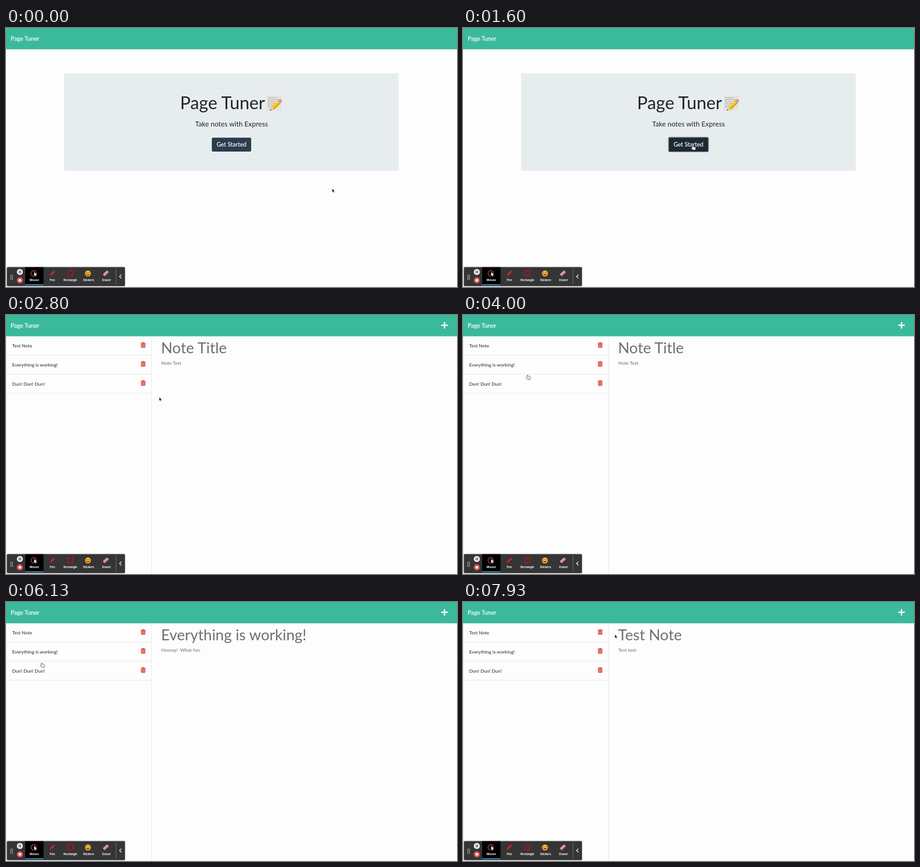
These frames come from a looping animation (986 by 568 pixels, 8 s). An HTML page:

```html
<!DOCTYPE html>
<html lang="en">
<head>
<meta charset="utf-8">
<title>Page Tuner</title>
<style>
html, body { margin: 0; width: 100%; height: 100%; overflow: hidden; background: #fdfdfd; }
svg { display: block; width: 100%; height: 100%; }
text { font-family: Lato, sans-serif; }
.dark { fill: #212529; }
.mid { text-anchor: middle; }
.light { fill: #fff; stroke: #fff; stroke-width: .2; }
.row { font-size: 10.3px; }
.title { font-size: 32.9px; fill: #6f6f6f; }
.body { font-size: 10.3px; fill: #6b6b6b; }
.rule { stroke: #e1e3e4; fill: none; }
.label text { font: 700 6.1px Inter, sans-serif; fill: #fff; text-anchor: middle; }

/* every part shares one 8 s clock */
.home, .notes, .loaded, .hover, .focus, .label, .n1, .n2, .n3, .arrow, .hand {
  animation: 8s step-end infinite;
}
.home { animation-name: home; }
.notes { animation-name: notes; }
.loaded { animation-name: loaded; }
.hover { animation-name: hover; }
.focus { animation-name: focus; }
.label { animation-name: label; }
.n1 { animation-name: n1; }
.n2 { animation-name: n2; }
.n3 { animation-name: n3; }
.hand { animation-name: hand; }
.arrow { animation-name: arrow; }
.cursor { animation: move 8s infinite; }

@keyframes home { 0% { opacity: 1 } 21.55%, 100% { opacity: 0 } }
@keyframes notes { 0% { opacity: 0 } 21.55%, 100% { opacity: 1 } }
@keyframes loaded { 0% { opacity: 0 } 22.45%, 100% { opacity: 1 } }
@keyframes hover { 0% { opacity: 0 } 7.5%, 100% { opacity: 1 } }
@keyframes focus { 0% { opacity: 0 } 17.5%, 100% { opacity: 1 } }
@keyframes label { 0% { opacity: 1 } 21.55% { opacity: 0 } 22.45%, 100% { opacity: 1 } }
@keyframes n1 { 0% { opacity: 1 } 65.7%, 100% { opacity: 0 } }
@keyframes n2 { 0% { opacity: 0 } 65.7% { opacity: 1 } 82.45%, 100% { opacity: 0 } }
@keyframes n3 { 0% { opacity: 0 } 82.45%, 100% { opacity: 1 } }
@keyframes hand {
  0% { opacity: 0 } 7.5% { opacity: 1 } 24.95% { opacity: 0 }
  35.8% { opacity: 1 } 98.2%, 100% { opacity: 0 }
}
@keyframes arrow {
  0% { opacity: 1 } 7.5% { opacity: 0 } 24.95% { opacity: 1 }
  35.8% { opacity: 0 } 98.2%, 100% { opacity: 1 }
}
/* the pointer advances about 15 times a second */
@keyframes move {
  0% { transform: translate(713px, 352px) }
  .75% { transform: translate(713px, 352px); animation-timing-function: steps(3, start) }
  3.25% { transform: translate(690px, 340px); animation-timing-function: steps(5, start) }
  7.42% { transform: translate(530px, 270px); animation-timing-function: steps(3, start) }
  9.92% { transform: translate(502px, 257px) }
  24.95% { transform: translate(502px, 257px); animation-timing-function: steps(9, start) }
  32.45% { transform: translate(380px, 190px) }
  34.1% { transform: translate(380px, 190px); animation-timing-function: steps(8, start) }
  40.8% { transform: translate(200px, 150px) }
  44.06% { transform: translate(200px, 150px); animation-timing-function: steps(8, start) }
  50.75% { transform: translate(141px, 131px) }
  52.45% { transform: translate(141px, 131px); animation-timing-function: steps(9, start) }
  59.95% { transform: translate(106px, 106px) }
  66.6% { transform: translate(106px, 106px); animation-timing-function: steps(9, start) }
  74% { transform: translate(74px, 146px) }
  74.95% { transform: translate(74px, 146px); animation-timing-function: steps(3, start) }
  77.35% { transform: translate(78px, 133px); animation-timing-function: steps(5, start) }
  81.6% { transform: translate(62px, 62px) }
  88.2% { transform: translate(62px, 62px); animation-timing-function: steps(6, start) }
  93.25% { transform: translate(230px, 66px); animation-timing-function: steps(8, start) }
  99.9%, 100% { transform: translate(332px, 71px) }
}
</style>
</head>
<body>
<svg viewBox="0 0 986 568">
  <defs>
    <filter id="shade" x="-5%" y="-20%" width="110%" height="140%">
      <feDropShadow dx="0" dy="0" stdDeviation="1.6" flood-opacity=".45"/>
    </filter>
    <g id="trash">
      <path d="M0 2.1H11M3.6 1.8L4.3 .6H6.7L7.4 1.8" fill="none" stroke="#db4a3d" stroke-width="1.4"/>
      <path d="M.9 3.4H10.1V11Q10.1 12.2 8.9 12.2H2.1Q.9 12.2 .9 11Z" fill="#db4a3d"/>
      <path d="M3.3 4.8V10.8M5.5 4.8V10.8M7.7 4.8V10.8" stroke="#f6cbc6" stroke-width=".8"/>
    </g>
  </defs>

  <rect width="986" height="568" fill="#fdfdfd"/>

  <g class="home">
    <rect x="127" y="99.5" width="731.5" height="213.5" rx="3" fill="#e7edee"/>
    <text class="dark" x="383" y="178" font-size="38.4" dx="-2.5">Page Tuner</text>
    <g>
      <rect x="570" y="148" width="32" height="34.5" fill="#e3e3e1"/>
      <path d="M573 153H592M573 157H598M573 161H590M573 165H588M573 169H584M573 173H580" stroke="#8d8d8b" stroke-width="1" stroke-dasharray="4 1 2.5 1"/>
      <path d="M577 181L579.5 172.5L585.5 179Z" fill="#ecd0a0"/>
      <path d="M577 181L578 177.6L580.4 180Z" fill="#444"/>
      <path d="M579.5 172.5L594 159L600 165.5L585.5 179Z" fill="#f6ca32"/>
      <path d="M583.5 177L598 163.3L600 165.5L585.5 179Z" fill="#d99b1e"/>
      <path d="M594 159L596 157.2L602 163.6L600 165.5Z" fill="#a9b0b3"/>
      <path d="M596 157.2Q600 154.6 602.7 157.6Q605 160.6 602 163.6Z" fill="#ee8f95"/>
    </g>
    <text class="dark mid" x="493" y="216" font-size="15.2">Take notes with Express</text>
    <rect class="focus" x="448.2" y="238.6" width="89.6" height="34" rx="4" fill="#99a2a8"/>
    <rect x="450" y="240.5" width="86" height="30.5" rx="2.8" fill="#2b3d4f"/>
    <rect class="hover" x="450" y="240.5" width="86" height="30.5" rx="2.8" fill="#1c2935"/>
    <text class="light mid" x="493" y="260.2" font-size="12.9">Get Started</text>
  </g>

  <g class="notes">
    <path class="rule" d="M318.5 47V568M.5 47V568"/>
    <g class="n1">
      <text class="title" x="339" y="83.5">Note Title</text>
      <text class="body" x="339.5" y="109.3">Note Text</text>
    </g>
    <g class="n2">
      <text class="title" x="339" y="83.5">Everything is working!</text>
      <text class="body" x="339.5" y="109.3" xml:space="preserve">Hooray!  What fun.</text>
    </g>
    <g class="n3">
      <text class="title" x="339" y="83.5">Test Note</text>
      <text class="body" x="339.5" y="109.3">Test text</text>
    </g>
    <g class="loaded">
      <path class="rule" d="M0 88H318M0 130H318M0 171.5H318"/>
      <text class="row dark" x="13.5" y="71.2">Test Note</text>
      <text class="row dark" x="13.5" y="112.8">Everything is working!</text>
      <text class="row dark" x="13.5" y="154.6">Dun! Dun! Dun!</text>
      <use href="#trash" x="294.4" y="59.6"/>
      <use href="#trash" x="294.4" y="101.1"/>
      <use href="#trash" x="294.4" y="143.1"/>
    </g>
  </g>

  <rect width="986" height="46.7" fill="#3bba9b"/>
  <text class="light" x="10.3" y="27.6" font-size="12.9">Page Tuner</text>
  <path class="loaded" d="M952.8 22.6H964.6M958.7 16.7V28.5" stroke="#fff" stroke-width="3" stroke-linecap="round"/>

  <g>
    <rect x="2" y="524.5" width="258" height="41.5" rx="2" fill="#343434" filter="url(#shade)"/>
    <path d="M10.5 541.3V552M14 541.3V552" stroke="#ddd" stroke-width="1.6" stroke-dasharray="1.6 1.4"/>
    <circle cx="30.3" cy="535" r="6.6" fill="#f1f1f1"/>
    <path d="M28.7 532V538M31.9 532V538" stroke="#333" stroke-width="1.5"/>
    <circle cx="30.3" cy="553.3" r="6.6" fill="#e4575b"/>
    <rect x="27.8" y="550.8" width="5" height="5" rx=".6" fill="#fff"/>
    <rect x="42" y="524.5" width="40" height="39.5" fill="#000"/>
    <rect x="42" y="562" width="40" height="2" fill="#2d8fd5"/>
    <circle cx="60.7" cy="538" r="5.9" fill="none" stroke="#d8504f" stroke-width="1.3"/>
    <path d="M61.3 534.6V544.2L63.5 542.2L65 545.3L66.6 544.5L65.2 541.6H68.2Z" fill="#fff" stroke="#000" stroke-width=".5"/>
    <g transform="translate(101 538) rotate(45)">
      <path d="M-2 -6.5H2V3.2L0 7.5L-2 3.2Z" fill="#e2222b"/>
      <path d="M-2 -3.5H2M-2 3.2H2" stroke="#7d1418" stroke-width=".9"/>
    </g>
    <rect x="135.2" y="532.6" width="11" height="10.6" fill="none" stroke="#c80f16" stroke-width="1.7"/>
    <circle cx="179.2" cy="538.3" r="6.6" fill="#f5b830"/>
    <path d="M175 537Q176.5 534.8 178 537M180.4 537Q181.9 534.8 183.4 537" fill="none" stroke="#5c3512" stroke-width="1"/>
    <path d="M175.6 540H182.8Q179.2 545.4 175.6 540Z" fill="#6e2a14"/>
    <circle cx="174.5" cy="539.4" r="1.5" fill="#ec6a3a"/>
    <circle cx="183.9" cy="539.4" r="1.5" fill="#ec6a3a"/>
    <g transform="translate(218.3 538) rotate(-42)">
      <rect x="-6.5" y="-3" width="13" height="6" rx="1" fill="#e59aac"/>
      <rect x="-6.5" y="1" width="13" height="2" rx=".8" fill="#c27487"/>
    </g>
    <path d="M240.5 527V562.5" stroke="#777"/>
    <path d="M252.4 541L248.2 545L252.4 549" fill="none" stroke="#fff" stroke-width="1.5"/>
    <g class="label">
      <text x="62" y="555.2">Mouse</text>
      <text x="101.3" y="555.2">Pen</text>
      <text x="140.8" y="555.2">Rectangle</text>
      <text x="180.4" y="555.2">Stickers</text>
      <text x="219.8" y="555.2">Eraser</text>
    </g>
  </g>

  <g class="cursor">
    <path class="arrow" d="M0 0V8.4L1.9 6.7L3.2 9.6L4.6 9L3.3 6.2H5.8Z" fill="#111" stroke="#fff" stroke-width=".6"/>
    <g class="hand" stroke="#333" stroke-width=".8" stroke-linejoin="round">
      <path d="M-.9 6.2V1Q0 -.4 1 1V3.4Q2 2.6 2.9 3.7Q4 3 4.8 4.1Q6.6 3.6 6.6 5.4V7.5L5.6 10.7H.4L-3 6.5Q-3.4 4.9 -2 5.1Z" fill="#fff"/>
      <path d="M1.7 6.6V8.8M3.3 6.6V8.8" fill="none" stroke-width=".6"/>
    </g>
  </g>
</svg>
</body>
</html>
```
